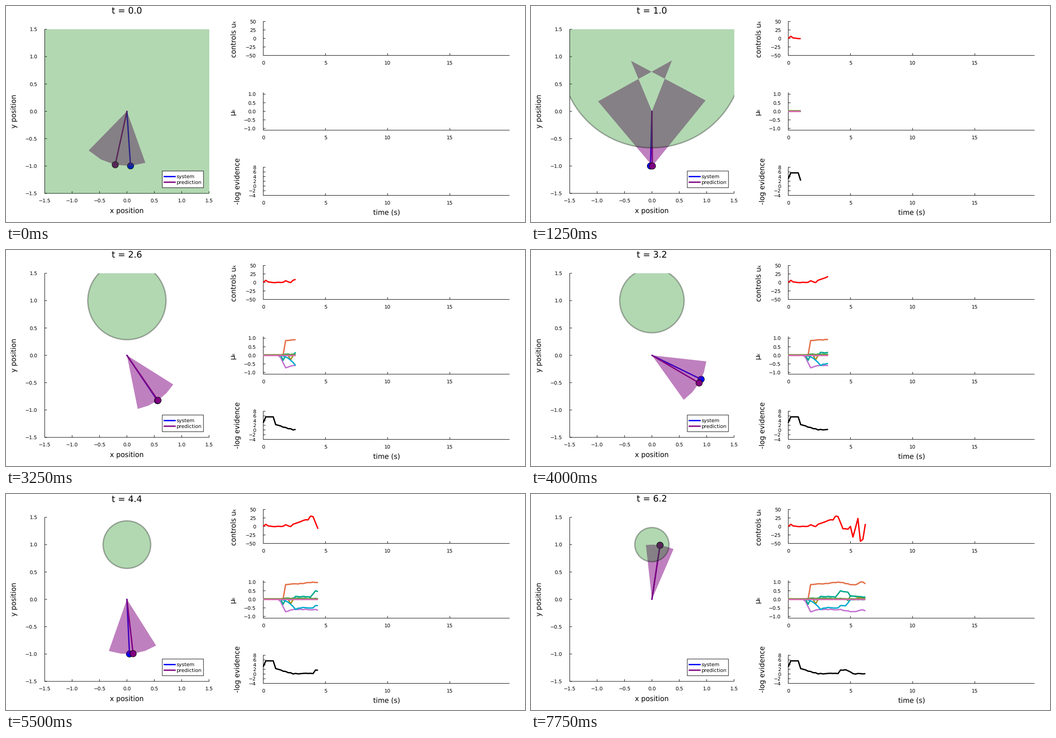
Write a matplotlib script that moves like this. It is 1159 px wide and 483 px high and loops after 8 s.

```python
import numpy as np
import matplotlib.pyplot as plt
from matplotlib.animation import FuncAnimation
from matplotlib.patches import Circle, Rectangle

W, H, DPI = 1159, 483, 64
PT = 72 / DPI  # points per pixel
STEPS, DT = 32, 0.2
times = np.arange(STEPS) * DT
rng = np.random.default_rng(4)

plt.rcParams["font.family"] = "DejaVu Sans"
plt.rcParams["text.hinting"] = "none"
plt.rcParams["path.snap"] = False


def track(*keys, jitter=0.0, start=0.0):
    """Straight runs between (time, value) keys, with noise after `start`."""
    noise = rng.uniform(-jitter, jitter, STEPS) * (times > start)
    return np.interp(times, *zip(*keys)) + noise


# Angles in degrees from hanging down: swing up, one full turn, then settle.
system = track((0, 3.8), (1, -1.5), (1.8, 3.1), (2.6, 34), (3.4, 74),
               (3.8, 119.7), (4.2, 293), (5, 571.8), (5.2, 588), (6.2, 531.5))
error = track((0, -16.1), (1, 2), (2.6, 0.6), (3.8, -9.4), (4.2, 3), (5, 6.2),
              (5.4, 0))
spread = track((0, 16), (1, 101), (1.8, 36.8), (2.6, 11.6), (5, 13.3), (6.2, 7.4))
predicted = system + error

controls = track((0, 0), (0.2, 6), (0.4, 0.5), (1.6, 0), (1.8, 5), (2.2, -1),
                 (2.4, 7), (3.4, 19), (3.6, 18.5), (3.8, 30), (4, 30), (4.4, -7),
                 (4.8, -8), (5, 0), (5.2, -32), (5.6, 23), (5.8, -44), (6, -38),
                 (6.2, 7), jitter=1)
evidence = track((0, 3.1), (0.2, 5.6), (0.8, 5.6), (1, 2.3), (1.8, 1),
                 (2.4, 0.1), (4, 0.2), (4.2, 1.6), (4.6, 1.7), (5, 0.9),
                 (5.2, 0.1), jitter=0.15, start=1)


def mean_track(*keys):
    return track(*keys, jitter=0.02, start=1.5)


means = {
    "#e36f47": mean_track((1.6, 0.03), (1.8, 0.85), (4.2, 1), (5, 0.86),
                          (5.4, 0.86), (5.8, 1), (6, 1), (6.2, 0.92)),
    "#3ea44e": mean_track((1.4, 0), (1.8, 0.06), (4.6, 0.04), (4.8, -0.06),
                          (5, 0.2), (5.4, 0.18), (6.2, 0.08)),
    "#c371d2": mean_track((1.3, 0), (1.8, -0.72), (2.4, -0.59), (4.2, -0.6),
                          (5, -0.72), (5.4, -0.72), (6, -0.6), (6.2, -0.67)),
    "#ac8e18": mean_track((2, 0), (2.2, -0.26), (2.4, 0), (5.4, 0),
                          (5.6, 0.12), (6.2, 0.04)),
    "#00a98d": mean_track((1.4, 0), (1.6, -0.3), (1.8, 0), (2.4, 0),
                          (2.6, 0.16), (3.8, 0.15), (4.2, 0.48), (4.8, 0.4),
                          (5, 0.2), (6.2, 0.12)),
    "#00a9cc": mean_track((1.4, 0), (2, -0.15), (2.6, -0.58), (3, -0.49),
                          (4, -0.5), (4.2, -0.36), (4.6, -0.38), (5, -0.01)),
    "#6c9f33": np.full(STEPS, 0.03),
    "#dd65b6": np.full(STEPS, -0.01),
}

fig = plt.figure(figsize=(W / DPI, H / DPI), dpi=DPI, facecolor="white")
ax = fig.add_axes([0, 0, 1, 1])
ax.axis("off")


def line(x, y, color="black", width=1, z=1, cap="butt"):
    return ax.plot(x, y, color=color, lw=width * PT, zorder=z,
                   solid_capstyle=cap, solid_joinstyle="round")[0]


def label(x, y, text, size=11.1, ha="center", rotation=0, z=1):
    return ax.text(x, y, text, fontsize=size * PT, ha=ha, va="baseline",
                   rotation=rotation, rotation_mode="anchor", zorder=z)


def number(value, decimals):
    return f"{value:.{decimals}f}".replace("-", "\u2212")


def draw_axes(left, right, top, bottom, xticks, yticks, text_y):
    """Each tick set is (values, pixel mapping, decimals)."""
    line([left, left], [top, bottom])
    line([left, right], [bottom, bottom])
    values, to_px, decimals = xticks
    for v in values:
        line([to_px(v)] * 2, [bottom, bottom - 5])
        label(to_px(v), text_y, number(v, decimals))
    values, to_px, decimals = yticks
    for v in values:
        line([left, left + 5], [to_px(v)] * 2)
        label(left - 16.3, to_px(v) + 4.1, number(v, decimals), ha="right")


CX, CY, UNIT = 270, 235.5, 122.3


def px(x):
    return CX + UNIT * x


def py(y):
    return CY - UNIT * y


def tx(t):
    return 574.5 + 27.775 * t


def y_map(zero, scale):
    return lambda v: zero - scale * v


uy, my, ey = y_map(72.5, 0.76), y_map(235.5, 38.3), y_map(402.5, 5.25)
halves = np.arange(-1.5, 1.6, 0.5)
seconds = (range(0, 16, 5), tx, 0)

draw_axes(86.5, 453.5, 52, 419, (halves, px, 1), (halves, py, 1), 439)
draw_axes(574.5, 1124.5, 34.5, 110.5, seconds, (range(-50, 51, 25), uy, 0), 130.5)
draw_axes(574.5, 1124.5, 193.4, 277.7, seconds, (halves[1:-1], my, 1), 297.5)
draw_axes(574.5, 1124.5, 360.5, 423.5, seconds, (range(-4, 9, 2), ey, 0), 444)

label(270, 462.5, "x position", 15.5)
label(23, 235.5, "y position", 15.5, rotation=90)
label(514, 73, "controls u\u2096", 15.5, rotation=90)
label(511, 235.5, "\u03bc\u2096", 15.5, rotation=90)
label(522, 392, "-log evidence", 15.5, rotation=90)
label(850, 467, "time (s)", 15.5)
title = label(270, 17.5, "", 19.6)

ax.add_patch(Rectangle((349, 369), 92, 37.3, fc="white", ec="black",
                       lw=PT, zorder=10))
for name, color, y in [("system", "blue", 381.4), ("prediction", "purple", 394)]:
    line([352, 379], [y, y], color, 3, 11)
    label(380.5, y + 4, name, 11.3, ha="left", z=11)

# The uncertainty fan is filled by the even-odd rule, so overlaps leave holes.
X0, X1, Y0, Y1, SUB = 140, 400, 105, 366, 4
grid_x = X0 + (np.arange((X1 - X0) * SUB)[None, :] + 0.5) / SUB
grid_y = Y0 + (np.arange((Y1 - Y0) * SUB)[:, None] + 0.5) / SUB
fan_rgba = np.zeros((Y1 - Y0, X1 - X0, 4))
fan_rgba[..., [0, 2]] = 128 / 255
fan = ax.imshow(fan_rgba, extent=(X0, X1, Y1, Y0), aspect="auto",
                interpolation="nearest", zorder=5)
ax.set_xlim(0, W)
ax.set_ylim(H, 0)


def tip(degrees):
    a = np.radians(degrees)
    return px(np.sin(a)), py(-np.cos(a))


def fan_coverage(mean, step):
    points = [(CX, CY)] + [tip(mean + step * i) for i in range(-2, 3)]
    inside = np.zeros((grid_y.size, grid_x.size), bool)
    for (xa, ya), (xb, yb) in zip(points, points[1:] + points[:1]):
        spans = (ya > grid_y) != (yb > grid_y)
        slope = (xb - xa) / (yb - ya or 1e-9)
        inside ^= spans & (grid_x < xa + (grid_y - ya) * slope)
    return inside.reshape(Y1 - Y0, SUB, X1 - X0, SUB).mean(axis=(1, 3))


def pendulum(color, z):
    rod = line([], [], color, 3, z, "round")
    bob = Circle((0, 0), 7.2, fc=color, ec="black", lw=PT, zorder=z + 1)
    return rod, ax.add_patch(bob)


def place(rod, bob, angle):
    x, y = tip(angle)
    rod.set_data([CX, x], [CY, y])
    bob.center = (x, y)


system_arm = pendulum("blue", 3)
prediction_arm = pendulum("purple", 6)

goal = ax.add_patch(Circle((CX, py(1)), 1, fc=(0, 128 / 255, 0, 0.3),
                           ec=(0, 0, 0, 0.3), lw=3 * PT, zorder=8))
goal.set_clip_path(Rectangle((86.5, 52), 367, 367, transform=ax.transData))

traces = [(line([], [], "red", 3, 2), uy(controls)),
          (line([], [], "black", 3, 2), ey(evidence))]
traces += [(line([], [], color, 3, 2), my(mean)) for color, mean in means.items()]


def update(k):
    t = times[k]
    title.set_text(f"t = {t:.1f}")
    place(*system_arm, system[k])
    place(*prediction_arm, predicted[k])
    fan_rgba[..., 3] = 0.5 * fan_coverage(predicted[k], spread[k])
    fan.set_data(fan_rgba.copy())
    goal.set_radius(UNIT / (t / 2 + 0.1))
    for trace, ys in traces:
        trace.set_data(tx(times[:k + 1]), ys[:k + 1])
    return []


anim = FuncAnimation(fig, update, frames=STEPS, init_func=lambda: update(0),
                     interval=250, repeat=True, repeat_delay=0, blit=False)
plt.show()
```
